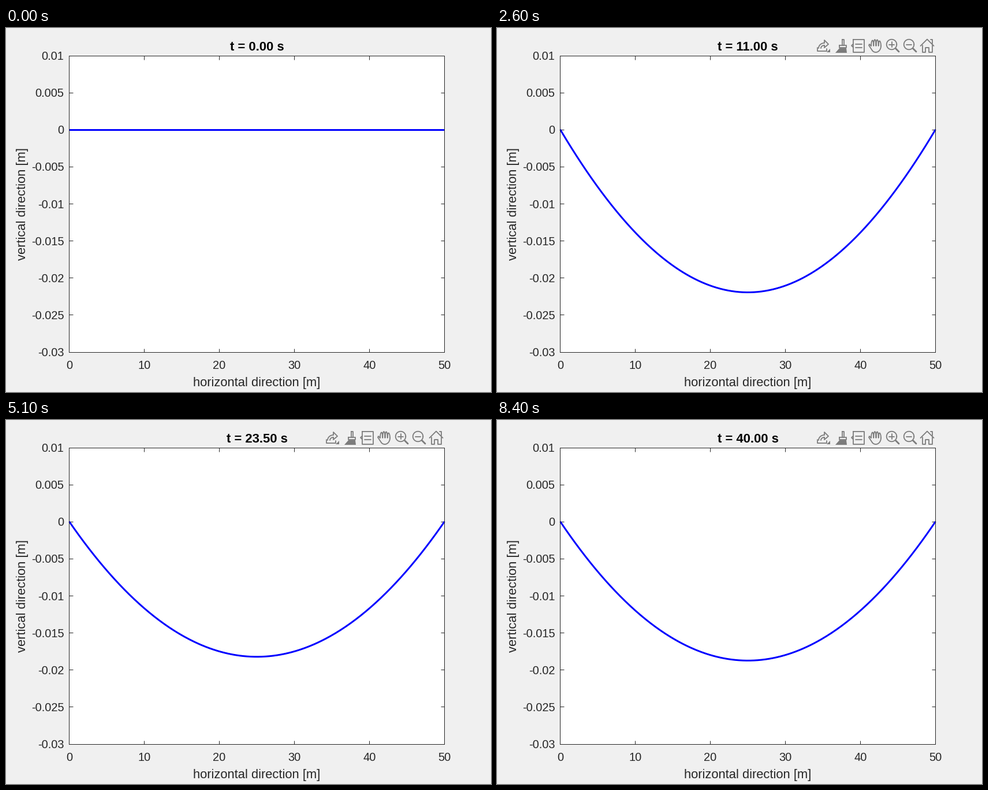
These frames come from a looping animation (840x630 px, 8500 ms). A matplotlib script:

```python
import numpy as np
import matplotlib.pyplot as plt
from matplotlib.animation import FuncAnimation

W, H, DPI = 840, 630, 100
PX = 72 / DPI                    # points per pixel
LEFT, RIGHT, TOP, BOTTOM = 109.49, 759.49, 47.51, 560.51
INK, GREY, PAPER = "#262626", "#7c7c7c", "#f0f0f0"
SPAN, SAG = 50, 0.01875          # string length and settled sag in metres
Y_MIN, Y_MAX = -0.03, 0.01
FRAMES, HOLD, STEP = 85, 4, 0.5
TOOLBAR_FROM = 8.0

plt.rcParams["font.family"] = "Liberation Sans"
fig = plt.figure(figsize=(W / DPI, H / DPI), dpi=DPI, facecolor=PAPER)

ax = fig.add_axes([LEFT / W, 1 - BOTTOM / H, (RIGHT - LEFT) / W, (BOTTOM - TOP) / H])
ax.set(xlim=(0, SPAN), ylim=(Y_MIN, Y_MAX))
x_ticks = np.arange(0, SPAN + 1, 10)
y_ticks = np.arange(-6, 3) * 0.005
ax.set_xticks(x_ticks)
ax.set_yticks(y_ticks)
ax.tick_params(direction="in", length=6.5 * PX, width=PX, color=INK, top=True,
               right=True, labelbottom=False, labelleft=False)
for spine in ax.spines.values():
    spine.set(linewidth=PX, color=INK)

# Overlay in pixel coordinates, y pointing down
ui = fig.add_axes([0, 0, 1, 1])
ui.set(xlim=(0, W), ylim=(H, 0))
ui.axis("off")


def label(x, y, text, size, ha="center", color=INK, **kw):
    return ui.text(x, y, text, fontsize=size * PX, ha=ha, va="baseline", color=color,
                   rotation_mode="anchor", **kw)


for v in x_ticks:
    label(LEFT + (RIGHT - LEFT) * v / SPAN, 590, f"{v}", 20)
for v in y_ticks:
    y = TOP + (BOTTOM - TOP) * (Y_MAX - v) / (Y_MAX - Y_MIN)
    label(100.5, y + 7.5, f"{round(v, 3) + 0.0:g}", 20, ha="right")
mid = (LEFT + RIGHT) / 2
label(mid, 620, "horizontal direction [m]", 22)
label(34, (TOP + BOTTOM) / 2, "vertical direction [m]", 22, rotation=90)
title = label(mid, 39, "", 22, color="black", weight="bold")

toolbar = []


def stroke(xs, ys, width=1.8):
    toolbar.extend(ui.plot(xs, ys, color=GREY, lw=width * PX,
                           solid_capstyle="round", solid_joinstyle="round"))


def fill(xs, ys):
    toolbar.extend(ui.fill(xs, ys, color=GREY, lw=0))


def rect(x0, y0, x1, y1):
    stroke([x0, x1, x1, x0, x0], [y0, y0, y1, y1, y0])


def arc(cx, cy, rx, ry, start=0, end=360):
    a = np.radians(np.linspace(start, end, 40))
    return cx + rx * np.cos(a), cy + ry * np.sin(a)


def export_icon(cx, cy):
    stroke([cx - 10, cx - 10, cx + 6, cx + 6], [cy + 4, cy + 10, cy + 10, cy + 6])
    for r in (6, 10):
        stroke(*arc(cx + 2, cy + 5, r, r - 1, 180, 270))
    stroke([cx + 2, cx + 2, cx + 9, cx + 2, cx + 2], [cy - 4, cy - 9, cy - 2, cy + 4, cy])
    fill([cx + 12, cx + 12, cx + 6], [cy + 6, cy + 12, cy + 12])


def brush_icon(cx, cy):
    rect(cx + 1.5, cy - 10.5, cx + 4.5, cy)
    rect(cx - 3, cy, cx + 9, cy + 4)
    fill([cx - 3, cx + 9, cx + 10, cx - 10], [cy + 5, cy + 5, cy + 13, cy + 13])


def datatip_icon(cx, cy):
    rect(cx - 9.5, cy - 11, cx + 10, cy + 11.5)
    for dy in (-3, 3):
        stroke([cx - 5, cx + 6], [cy + dy, cy + dy])
    stroke([cx - 9.5, cx - 12, cx - 9.5], [cy - 2.5, cy, cy + 2.5])


def hand_icon(cx, cy):
    s = np.linspace(0, 1, 81)
    tips = 11 - 14 * (s - 0.45) ** 2
    fingers = cy + 1 - tips * np.abs(np.sin(4 * np.pi * s)) ** 0.4
    stroke(cx - 7 + 17 * s, fingers)
    stroke(*arc(cx + 1, cy + 1, 9, 11, 0, 130))
    stroke([cx - 5, cx - 11, cx - 10, cx - 7], [cy + 9, cy, cy - 2, cy + 1])


def zoom_icon(cx, cy, plus):
    stroke(*arc(cx, cy, 8.8, 8.8))
    stroke([cx - 4.5, cx + 4.5], [cy, cy])
    if plus:
        stroke([cx, cx], [cy - 4.5, cy + 4.5])
    stroke([cx + 7, cx + 12.5], [cy + 7, cy + 12.5], 2.8)


def home_icon(cx, cy):
    stroke([cx - 11.5, cx, cx + 11.5], [cy + 1, cy - 10.5, cy + 1])
    stroke([cx + 5.5, cx + 8.5, cx + 8.5], [cy - 10, cy - 10, cy - 3])
    for side in (-1, 1):
        stroke(cx + side * np.array([8.5, 8.5, 3, 3, 0]), cy + np.array([0, 12, 12, 4, 4]))


export_icon(565, 30)
brush_icon(596, 30)
datatip_icon(626, 30.5)
hand_icon(655, 30)
zoom_icon(683.5, 28.5, True)
zoom_icon(713.5, 28.5, False)
home_icon(745, 30)

x = np.linspace(0, SPAN, 301)
parabola = 4 * x * (SPAN - x) / SPAN ** 2
line, = ax.plot(x, 0 * x, color="blue", lw=3 * PX, clip_on=False, solid_capstyle="butt")


def first_mode(t, decay=0.15, freq=0.267, cross=5.75, amp=0.3835):
    """Damped swing of the lowest mode about its rest shape."""
    def swing(s):
        return amp * np.exp(-decay * (s - cross)) * np.sin(freq * (s - cross))
    lag = 32 / np.pi ** 3 + swing(0)
    return swing(t) - lag * np.exp(-(t / 3.2) ** 1.5)


def string_shape(t):
    """Sagging string: rest parabola plus decaying odd sine modes."""
    if t == 0:
        return 0 * x
    u = parabola + first_mode(t) * np.sin(np.pi * x / SPAN)
    for n in range(3, 40, 2):
        u -= 32 / (np.pi * n) ** 3 * np.exp(-0.15 * n * n * t) * np.sin(n * np.pi * x / SPAN)
    return -SAG * u


def update(i):
    t = max(0, i - HOLD) * STEP
    line.set_ydata(string_shape(t))
    title.set_text(f"t = {t:.2f} s")
    for part in toolbar:
        part.set_visible(t >= TOOLBAR_FROM)
    return [line, title, *toolbar]


anim = FuncAnimation(fig, update, frames=FRAMES, interval=100, repeat=True,
                     repeat_delay=0, blit=False)
plt.show()
```
